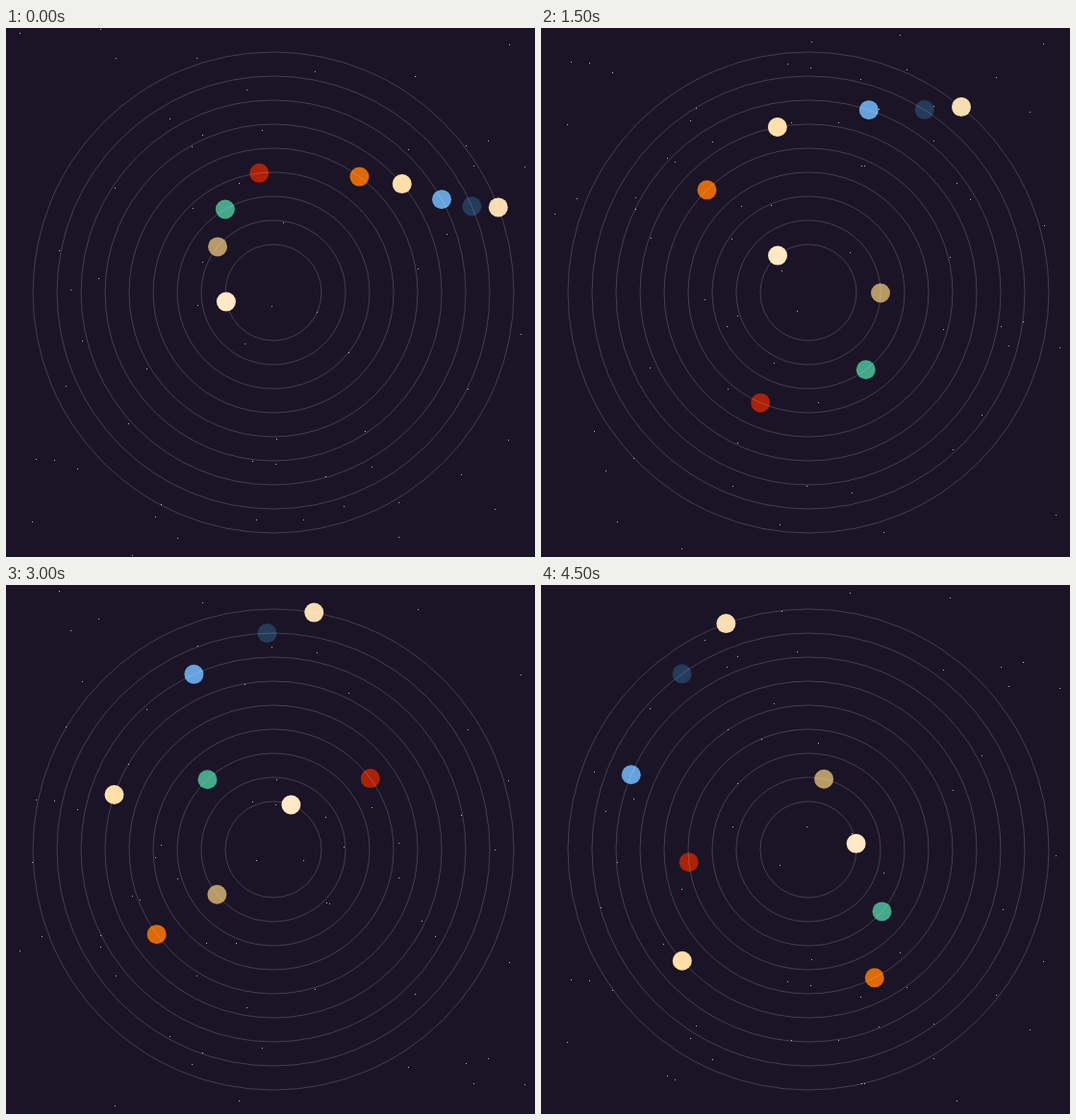
An HTML page with a canvas that plays this animation: 550 by 550 pixels, repeating every 4.75 s.

```html
<!DOCTYPE html>
<html lang="en">
<head>
<meta charset="utf-8">
<title>Orbits</title>
<style>
  html, body { margin: 0; width: 100%; height: 100%; overflow: hidden; background: #1b1426; }
  canvas { display: block; }
</style>
</head>
<body>
<canvas id="stage" width="550" height="550"></canvas>
<script>
const ctx = document.getElementById('stage').getContext('2d');
const SIZE = 550, CX = 278, CY = 275;
const STEP_MS = 250, STEPS = 19;
const STAR_COUNT = 70, STAR_FALL = 31.25, STAR_PERIOD = 600;

// All planets left the same angle together, this many steps before the loop starts.
const LAUNCH_ANGLE = 1.9, HEAD_START = 3.8;

// Inner to outer; speed in degrees per step, counterclockwise.
const planets = [
  { color: '#ffe8c4', speed: 49.78 },
  { color: '#b79a66', speed: 36.5 },
  { color: '#45a88a', speed: 31.1 },
  { color: '#ab2207', speed: 24.96 },
  { color: '#dd6a06', speed: 13.55 },
  { color: '#ffdfa8', speed: 10.07 },
  { color: '#66a3dd', speed: 7.12 },
  { color: '#243c5a', speed: 5.68 },
  { color: '#f6deb2', speed: 4.96 }
].map((planet, i) => ({ ...planet, radius: 50 + 25 * i }));

function seededRandom(seed) {
  return () => {
    seed = (seed * 1664525 + 1013904223) % 4294967296;
    return seed / 4294967296;
  };
}

const random = seededRandom(7);
const stars = Array.from({ length: STAR_COUNT }, () => ({
  x: Math.floor(random() * SIZE),
  y: random() * STAR_PERIOD
}));

function circle(x, y, radius) {
  ctx.beginPath();
  ctx.arc(x, y, radius, 0, Math.PI * 2);
}

function drawStars(step) {
  ctx.fillStyle = 'rgba(255, 255, 255, 0.7)';
  for (const { x, y } of stars) {
    ctx.fillRect(x, Math.floor((y + step * STAR_FALL) % STAR_PERIOD), 1, 1);
  }
}

function drawPlanet({ color, speed, radius }, step) {
  const angle = (LAUNCH_ANGLE + speed * (step + HEAD_START)) * Math.PI / 180;
  ctx.fillStyle = color;
  circle(CX + radius * Math.cos(angle), CY - radius * Math.sin(angle), 10);
  ctx.fill();
}

function drawOrbit({ radius }) {
  circle(CX, CY, radius);
  ctx.stroke();
}

function draw(step) {
  ctx.fillStyle = '#1b1426';
  ctx.fillRect(0, 0, SIZE, SIZE);
  drawStars(step);
  planets.forEach(planet => drawPlanet(planet, step));
  ctx.strokeStyle = 'rgba(255, 255, 255, 0.18)';
  ctx.lineWidth = 1;
  planets.forEach(drawOrbit);
}

const origin = performance.now();
function tick() {
  const elapsed = Math.max(0, performance.now() - origin);
  draw(Math.floor(elapsed / STEP_MS) % STEPS);
  requestAnimationFrame(tick);
}
tick();
</script>
</body>
</html>
```
